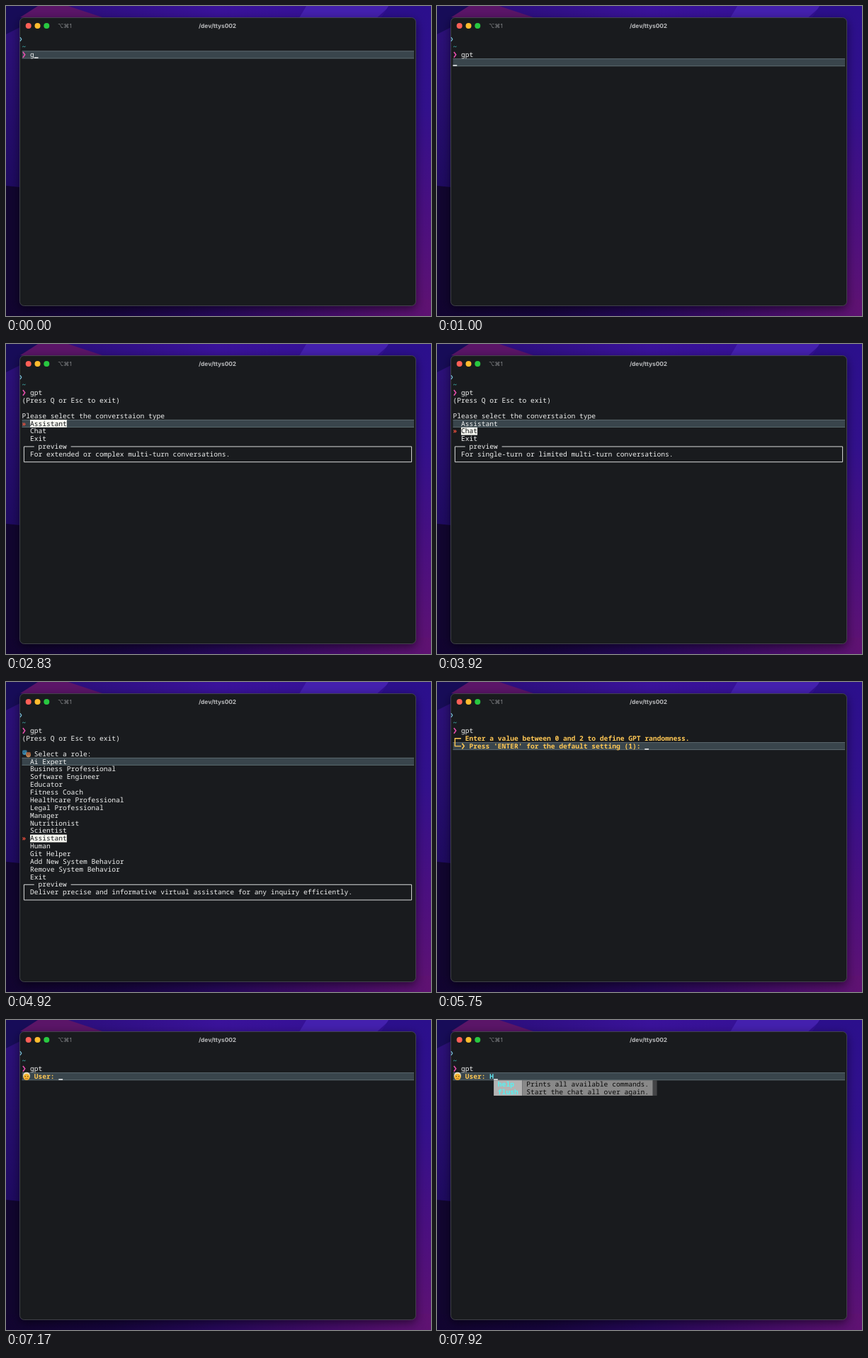
An HTML page with a canvas that plays this animation: 600x438 px, repeating every 8 s.

```html
<!DOCTYPE html>
<html lang="en">
<head>
<meta charset="utf-8">
<title>Terminal chat</title>
<style>
  html, body { margin: 0; width: 100%; height: 100%; overflow: hidden; background: #1c0a50; }
  canvas { display: block; width: 100vw; height: 100vh; }
</style>
</head>
<body>
<canvas id="stage"></canvas>
<script>
const W = 600, H = 438, LOOP = 8000;
const LEFT = 22.5, CELL = 5.76, FIRST = 58, LINE = 10.87;
const MONO = '"Noto Sans Mono", "DejaVu Sans Mono", monospace';
const WHITE = '#f1f2f1', AMBER = '#ffc855', CYAN = '#5fe3ee', PINK = '#ea4fae';

const canvas = document.getElementById('stage');
const scale = window.devicePixelRatio || 1;
canvas.width = W * scale;
canvas.height = H * scale;
const ctx = canvas.getContext('2d');
ctx.scale(scale, scale);
ctx.textRendering = 'geometricPrecision';

const colX = col => LEFT + col * CELL;
const rowY = row => FIRST + row * LINE;

function rect(x, y, w, h, fill) {
  ctx.fillStyle = fill;
  ctx.fillRect(x, y, w, h);
}

function polygon(fill, ...points) {
  ctx.fillStyle = fill;
  ctx.beginPath();
  points.forEach(([x, y]) => ctx.lineTo(x, y));
  ctx.fill();
}

function disc(x, y, r, fill) {
  ctx.fillStyle = fill;
  ctx.beginPath();
  ctx.arc(x, y, r, 0, Math.PI * 2);
  ctx.fill();
}

function stroke(color, width, ...points) {
  ctx.strokeStyle = color;
  ctx.lineWidth = width;
  ctx.beginPath();
  points.forEach(([x, y]) => ctx.lineTo(x, y));
  ctx.stroke();
}

function gradient(x0, y0, x1, y1, ...colors) {
  const g = ctx.createLinearGradient(x0, y0, x1, y1);
  colors.forEach((c, i) => g.addColorStop(i / (colors.length - 1), c));
  return g;
}

// Text on the terminal's character grid
function print(col, row, text, color = WHITE, weight = 400) {
  ctx.font = `${weight} 9.6px ${MONO}`;
  ctx.fillStyle = color;
  ctx.textAlign = 'left';
  ctx.textBaseline = 'alphabetic';
  [...text].forEach((ch, i) => ctx.fillText(ch, colX(col + i), rowY(row) + 3.2));
}

function chevron(col, row, color) {
  const x = colX(col) + 1.4, y = rowY(row);
  stroke(color, 1.6, [x, y - 3.8], [x + 2.8, y], [x, y + 3.8]);
}

function guide(row) {
  const top = rowY(row) - LINE / 2;
  rect(LEFT, top, 553.5, LINE, '#39454c');
  rect(LEFT, top, 553.5, 0.8, '#647177');
  rect(LEFT, top + LINE - 0.8, 553.5, 0.8, '#647177');
}

const cursor = (col, row) => rect(colX(col), rowY(row) + 3.6, CELL, 1.4, '#ffffff');

function wallpaper() {
  rect(0, 0, W, H, gradient(0, 0, W, 0, '#260d70', '#3a129a', '#300f92'));
  polygon('#170c58', [0, 0], [80, 0], [0, 45]);
  polygon('#5b1568', [45, 0], [88, 0], [136, 16], [60, 20], [20, 16]);
  polygon('#4420ae', [424, 0], [542, 0], [520, 20], [412, 20]);
  polygon(gradient(0, 0, 0, H, '#2b0f8c', '#32108c', '#4a0f80', '#5f1272'),
    [540, 0], [W, 0], [W, H], [500, H], [530, 16]);
  polygon(gradient(0, 40, 0, 260, '#2c1078', '#1e0a60'), [0, 40], [40, 20], [40, 256], [0, 256]);
  polygon('#11052f', [0, 254], [40, 258], [40, H], [0, H]);
  polygon(gradient(0, 0, W, 0, '#11042f', '#16053d', '#26085a', '#420c68', '#5f1272'),
    [0, 415], [W, 415], [W, H], [0, H]);
}

function windowFrame() {
  ctx.save();
  ctx.shadowColor = 'rgba(0,0,0,.55)';
  ctx.shadowBlur = 14 * scale;
  ctx.shadowOffsetY = 4 * scale;
  ctx.fillStyle = '#191b1e';
  ctx.beginPath();
  ctx.roundRect(19.5, 16.5, 559, 407, 6);
  ctx.fill();
  ctx.restore();
  ctx.strokeStyle = '#4b4d52';
  ctx.lineWidth = 0.8;
  ctx.stroke();

  ['#fe5f57', '#febc2e', '#28c840'].forEach((c, i) => disc(31.7 + i * 12.8, 28, 4, c));
  ctx.textBaseline = 'alphabetic';
  ctx.textAlign = 'left';
  ctx.fillStyle = '#85878a';
  ctx.font = '8.2px Inter, "DejaVu Sans", sans-serif';
  ctx.fillText('⌥⌘1', 73, 31);
  ctx.textAlign = 'center';
  ctx.fillStyle = '#b9babc';
  ctx.font = '700 8.3px Inter, sans-serif';
  ctx.fillText('/dev/ttys002', 298.5, 31);

  stroke('#7cc8e8', 1.2, [20, 44.2], [21.8, 47], [20, 49.8]);
  print(0, 0, '~', '#48c9c5');
}

function robot(row) {
  const x = 29, y = rowY(row);
  rect(x - 5.5, y - 1.5, 11, 4, '#4d8790');
  rect(x - 4.2, y - 3, 8.4, 7.8, '#a9c0c5');
  rect(x - 2.5, y - 4.5, 5, 1.6, '#d9534a');
  disc(x, y - 5, 1.1, '#e8665a');
  disc(x - 2, y - 0.5, 1.2, '#24434b');
  disc(x + 2, y - 0.5, 1.2, '#24434b');
  rect(x - 2.3, y + 2.2, 4.6, 1.2, '#3c5960');
}

function masks(row) {
  const x = 29, y = rowY(row);
  disc(x - 2.6, y - 1.8, 3.2, '#3c8fb4');
  rect(x - 5.6, y - 5, 6, 3, '#2f7599');
  disc(x + 2.6, y + 1.6, 3.3, '#c78a57');
  rect(x - 0.5, y - 2.2, 6, 2.8, '#a85f3d');
  rect(x - 4.2, y - 2, 1.2, 1, '#15222b');
  rect(x + 1, y + 1, 1.2, 1, '#3a1d16');
  rect(x + 3.4, y + 1, 1.2, 1, '#3a1d16');
}

function person(row) {
  const x = 29, y = rowY(row);
  disc(x, y - 1, 5, '#e7dfc8');
  disc(x, y + 0.7, 4.6, '#f6b733');
  rect(x - 2.4, y - 0.8, 1.2, 1.4, '#5b3518');
  rect(x + 1.2, y - 0.8, 1.2, 1.4, '#5b3518');
  rect(x - 2, y + 2.6, 4, 1, '#b8641f');
}

function previewBox(row, text) {
  const left = colX(0.5), right = colX(95.5), top = rowY(row), bottom = rowY(row + 2);
  stroke('#d9dbdb', 1, [colX(3), top], [left, top], [left, bottom],
    [right, bottom], [right, top], [colX(12), top]);
  print(4, row, 'preview');
  print(2, row + 1, text);
}

function menu({ title, titleCol, icon, items, previews }, selected) {
  print(0, 2, '(Press Q or Esc to exit)');
  if (icon) icon(4);
  print(titleCol, 4, title);
  guide(5);
  items.forEach((item, i) => {
    const row = 5 + i, active = i === selected;
    if (active) {
      rect(colX(2), rowY(row) - LINE / 2, item.length * CELL, LINE, '#f4f5ef');
      print(0, row, '»', '#f0503c', 700);
    }
    print(2, row, item, active ? '#15171a' : WHITE);
  });
  const preview = previews && previews(items[selected]);
  if (preview) previewBox(5 + items.length, preview);
}

const models = {
  title: 'Select a model:', titleCol: 3, icon: robot,
  items: ['gpt3', 'gpt4', 'gpt4-vision', 'mistral', 'anthropic', 'Exit']
};

const chatTypes = {
  title: 'Please select the converstaion type', titleCol: 0,
  items: ['Assistant', 'Chat', 'Exit'],
  previews: item => ({
    Assistant: 'For extended or complex multi-turn conversations.',
    Chat: 'For single-turn or limited multi-turn conversations.'
  })[item]
};

const roles = {
  title: 'Select a role:', titleCol: 3, icon: masks,
  items: ['Ai Expert', 'Business Professional', 'Software Engineer', 'Educator',
    'Fitness Coach', 'Healthcare Professional', 'Legal Professional', 'Manager',
    'Nutritionist', 'Scientist', 'Assistant', 'Human', 'Git Helper',
    'Add New System Behavior', 'Remove System Behavior', 'Exit'],
  previews: item => item === 'Assistant'
    ? 'Deliver precise and informative virtual assistance for any inquiry efficiently.'
    : /Exit|Behavior/.test(item) ? '' : `Provide clear and practical answers as: ${item}.`
};

function shell(t) {
  const typed = 'gpt'.slice(0, t < 170 ? 1 : t < 330 ? 2 : 3);
  const entered = t >= 830;
  guide(entered ? 2 : 1);
  print(2, 1, typed);
  cursor(entered ? 0 : 2 + typed.length, entered ? 2 : 1);
}

function randomness() {
  guide(3);
  const x = colX(0.5), y2 = rowY(2), y3 = rowY(3);
  stroke(AMBER, 1.4, [colX(2), y2], [x, y2], [x, y3], [colX(2), y3]);
  chevron(2, 3, AMBER);
  print(3, 2, 'Enter a value between 0 and 2 to define GPT randomness.', AMBER, 700);
  print(4, 3, "Press 'ENTER' for the default setting (1): ", AMBER, 700);
  cursor(47, 3);
}

function chat(typed) {
  guide(2);
  person(2);
  print(3, 2, 'User:', AMBER, 700);
  print(9, 2, typed, CYAN, 700);
  cursor(9 + typed.length, 2);
  if (!typed) return;
  const top = rowY(3) - LINE / 2;
  rect(colX(10), top, 7 * CELL, 2 * LINE, '#b4b4b4');
  rect(colX(17), top, 32 * CELL, 2 * LINE, '#898989');
  rect(colX(49), top, CELL, 2 * LINE, '#434446');
  [['help', 'Prints all available commands.'],
   ['flush', 'Start the chat all over again.']].forEach(([name, info], i) => {
    print(11, 3 + i, name, '#55f3f3', 700);
    print(18, 3 + i, info, '#080808');
  });
}

function draw(t) {
  wallpaper();
  windowFrame();
  if (t < 1420) shell(t);
  else print(2, 1, 'gpt');
  chevron(0, 1, PINK);
  if (t < 1420) return;
  if (t < 2750) menu(models, t < 1750 ? 0 : 1);
  else if (t < 4170) menu(chatTypes, t < 3420 ? 0 : 1);
  else if (t < 5670) {
    const steps = Math.min(6, Math.max(0, Math.floor((t - 4330) / 83)));
    menu(roles, (16 - steps) % 16);
  } else if (t < 6920) randomness();
  else chat(t < 7830 ? '' : 'H');
}

function tick() {
  draw(performance.now() % LOOP);
  requestAnimationFrame(tick);
}
tick();
</script>
</body>
</html>
```
